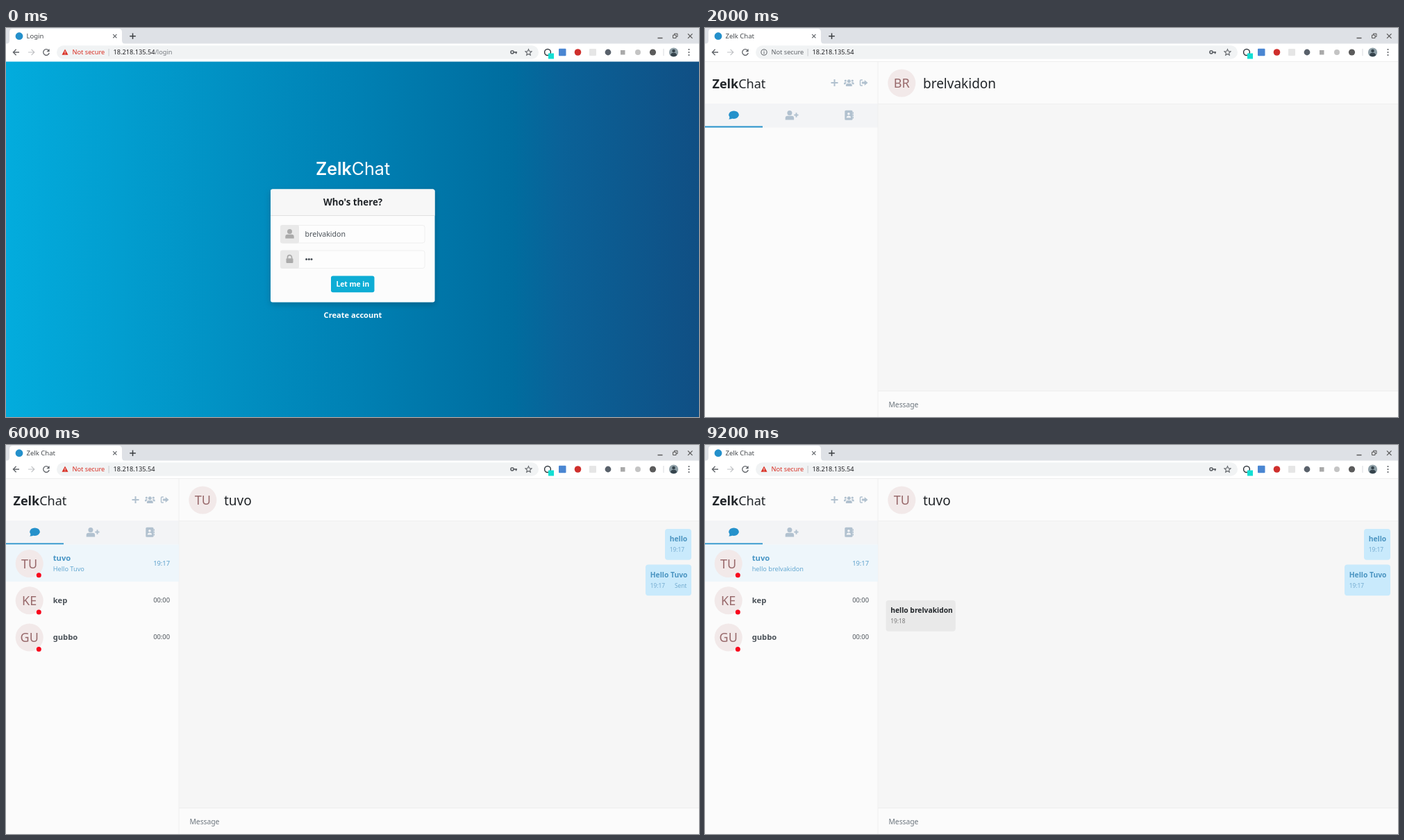
An HTML page that plays this animation: 998 px wide and 561 px high, repeating every 10000 ms.

```html
<!DOCTYPE html>
<html lang="en">
<head>
<meta charset="utf-8">
<title>Chat walkthrough</title>
<style>
  html, body { margin: 0; width: 100%; height: 100%; overflow: hidden; background: #fff; }
  svg { display: block; width: 100%; height: 100%; }
  text { font-family: "Noto Sans", "Open Sans", sans-serif; white-space: pre; }
  .logo { font-family: Inter, sans-serif; }
</style>
</head>
<body>
<svg id="stage" viewBox="0 0 998 561">
  <defs>
    <linearGradient id="sea">
      <stop offset="0" stop-color="#03acdd"/>
      <stop offset=".5" stop-color="#0081b4"/>
      <stop offset=".73" stop-color="#006d9f"/>
      <stop offset=".8" stop-color="#0a6298"/>
      <stop offset="1" stop-color="#104f84"/>
    </linearGradient>
    <filter id="shadow" x="-10%" y="-10%" width="120%" height="125%">
      <feDropShadow dx="0" dy="3" stdDeviation="4" flood-opacity=".2"/>
    </filter>
  </defs>
  <g id="page"></g>
  <g id="browser"></g>
</svg>
<script>
const LOOP = 10000, STEP = 2000;
const BLUE = '#2591cb', PALE = '#b1c1cf', INK = '#212529', RED = '#d93025', GREY = '#5f6368';
const BRAND = ['Zelk', 'Chat'], USER = 'brelvakidon';
const FRIENDS = ['tuvo', 'kep', 'gubbo'];

const rect = (x, y, w, h, fill, rx = 0, more = '') =>
  `<rect x="${x}" y="${y}" width="${w}" height="${h}" rx="${rx}" fill="${fill}" ${more}/>`;
const dot = (x, y, r, fill, more = '') => `<circle cx="${x}" cy="${y}" r="${r}" fill="${fill}" ${more}/>`;
const line = (d, color, width = 1.2, more = '') =>
  `<path d="${d}" fill="none" stroke="${color}" stroke-width="${width}" ${more}/>`;
const shape = (d, fill) => `<path d="${d}" fill="${fill}"/>`;
const text = (x, y, size, str, fill = INK, weight = 400, more = '') =>
  `<text x="${x}" y="${y}" font-size="${size}" fill="${fill}" font-weight="${weight}" ${more}>${str}</text>`;
const at = (x, y, body) => `<g transform="translate(${x} ${y})">${body}</g>`;
const MID = 'text-anchor="middle"', END = 'text-anchor="end"';
const capital = s => s[0].toUpperCase() + s.slice(1);

// Icons are drawn around their own centre.
const icon = {
  comment: c => `<ellipse cy="-.6" rx="7.3" ry="5.8" fill="${c}"/>` + shape('M-6 1.5Q-5.8 4-7.3 5.8Q-4 6-1.5 4.2Z', c),
  person: c => dot(0, -3.2, 3.5, c) + shape('M-6.2 6.8V4.2Q-6.2 1-3 1H3Q6.2 1 6.2 4.2V6.8Z', c),
  addPerson: c => at(-2.6, 0, icon.person(c)) + line('M7 -3.5V3M3.8 -.3H10', c, 1.9),
  book: c => rect(-6.2, -7, 11.2, 14, c, 1.6) +
    rect(5, -4.6, 1.4, 2.6, c) + rect(5, -1.2, 1.4, 2.6, c) + rect(5, 2.2, 1.4, 2.6, c) +
    dot(-.6, -2, 1.8, '#f3f4f6') + shape('M-3.8 3.6Q-3.8 .6-.6 .6Q2.6 .6 2.6 3.6Z', '#f3f4f6'),
  people: c => dot(0, -2.2, 2.5, c) + dot(-5, -3, 1.6, c) + dot(5, -3, 1.6, c) +
    shape('M-4.4 5V3.6Q-4.4 1-2 1H2Q4.4 1 4.4 3.6V5Z', c) +
    shape('M-7.3 2.2V.8Q-7.3-.8-5.6-.8H-3.4L-5.2 2.2ZM7.3 2.2V.8Q7.3-.8 5.6-.8H3.4L5.2 2.2Z', c),
  plus: c => line('M0 -5V5M-5 0H5', c, 2),
  leave: c => line('M-1.6 -4H-4Q-5 -4-5 -3V3Q-5 4-4 4H-1.6', c, 1.5) +
    shape('M-2.6-1.4H1.2V-4L6 0L1.2 4V1.4H-2.6Z', c),
  check: c => line('M-4.6 .4L-1.6 3.3L4.8 -3.2', c, 2),
  cross: c => line('M-3.2 -3.2L3.2 3.2M3.2 -3.2L-3.2 3.2', c, 2),
  lock: c => rect(-5, -1, 10, 6.6, c, 1.2) + line('M-3 -.5V-2.6A3 3 0 0 1 3 -2.6V-.5', c, 1.7),
};
const put = (name, x, y, color = PALE) => at(x, y, icon[name](color));

function browser(title, path, warn) {
  const tint = warn ? RED : GREY;
  const badge = warn
    ? shape('M85 30.6L89.5 38.8H80.5Z', RED) + rect(84.5, 33.4, 1, 2.6, '#fff') + rect(84.5, 36.7, 1, 1, '#fff')
    : dot(85, 35, 4.1, 'none', `stroke="${GREY}"`) + rect(84.5, 34.3, 1, 3, GREY) + rect(84.5, 32.5, 1, 1, GREY);
  const extensions =
    dot(780, 35, 4.4, 'none', 'stroke="#333a40" stroke-width="1.5"') + rect(781, 36.5, 8, 8, '#13dfd3') +
    rect(796, 29.8, 10.5, 10.5, '#4a86d2', 1) + dot(823.5, 35, 4.8, '#cf2f2c') +
    rect(840, 30, 10, 10, '#e6e6e6', 1) + dot(867, 35, 4.4, '#59616b') +
    rect(885, 32, 6.5, 6.5, '#aaa') + dot(910, 35, 4, '#c4c4c4') + dot(931.5, 35, 4.6, '#5b5b5b');
  return rect(0, 0, 998, 23, '#dee1e6') +
    rect(0, 22.5, 998, 26, '#fff') +
    shape('M0 23Q5 23 5 18V6Q5 1 10 1H162Q167 1 167 6V18Q167 23 172 23Z', '#fff') +
    dot(19, 11.7, 5.4, '#2490cb') +
    text(29.5, 15, 9.5, title, '#45494d') +
    line('M154.2 9.2L159.4 14.4M159.4 9.2L154.2 14.4', GREY, 1.2) +
    line('M182.5 7.5V16M178.2 11.7H186.8', '#3c4043', 1.5) +
    line('M938.5 14.5H945.5', '#555', 1.4) +
    line('M960.5 10.2H965V14.5H960.5ZM962.5 10V8.2H967V12.5H965.2', '#555', 1) +
    line('M982 8.3L988.5 14.8M988.5 8.3L982 14.8', '#555', 1.2) +
    line('M19 35H10.6M14.6 30.8L10.4 35L14.6 39.2', GREY, 1.3) +
    line('M32 35H40.6M36.6 30.8L40.8 35L36.6 39.2', '#c0c2c5', 1.2) +
    line('M61.3 32.2A4.3 4.3 0 1 0 62.2 36', GREY, 1.3) + shape('M62.6 30V34.2H58.4Z', GREY) +
    rect(73, 25.3, 694, 19.4, '#f1f3f4', 9.7) + badge +
    text(95.5, 38.4, 9.2, 'Not secure', tint) +
    rect(147.6, 30, 1, 10.5, '#c8cbce') +
    text(154.5, 38.4, 9.2, `18.218.135.54<tspan fill="#777b80">${path}</tspan>`, '#202124') +
    dot(729, 34.8, 2.1, 'none', `stroke="${GREY}" stroke-width="1.6"`) + line('M731 34.8H736M734.6 34.8V37.2', GREY, 1.7) +
    line('M752.5 30.6L753.8 33.6L757 33.9L754.6 36L755.3 39.2L752.5 37.5L749.7 39.2L750.4 36L748 33.9L751.2 33.6Z', GREY, 1.1) +
    extensions +
    rect(946.5, 30, 1, 10, '#dadce0') +
    dot(961.5, 35, 6.6, '#8fa0a8') + dot(961.5, 33, 2.3, '#35434c') + shape('M957 39.6Q957 35.8 961.5 35.8Q966 35.8 966 39.6Q961.5 43 957 39.6Z', '#35434c') +
    [31, 35, 39].map(y => dot(983.5, y, 1.1, GREY)).join('');
}

function loginPage() {
  const field = (y, name) => rect(395.5, y, 207.5, 25.5, '#fdfdfd', 3, 'stroke="#efefef"') +
    rect(395, y - .5, 27, 26.5, '#e9e9e9', 3) + put(name, 408.5, y + 12.3, '#aaa');
  return rect(0, 48, 998, 513, 'url(#sea)') +
    text(499.5, 212, 25, `<tspan font-weight="600">${BRAND[0]}</tspan>${BRAND[1]}`, '#fff', 400, MID + ' class="logo"') +
    rect(381, 232.5, 236.5, 163, '#fcfcfc', 3, 'filter="url(#shadow)"') +
    shape('M381 270V235.5Q381 232.5 384 232.5H614.5Q617.5 232.5 617.5 235.5V270Z', '#f7f7f7') +
    rect(381, 270, 236.5, 1, '#e0e0e0') +
    text(499.5, 256, 13.3, "Who's there?", INK, 600, MID) +
    field(284.5, 'person') + text(430.5, 300.7, 10.6, USER, '#495057') +
    field(321, 'lock') + [432.6, 436.3, 440].map(x => dot(x, 333.5, 1.5, '#495057')).join('') +
    rect(468, 357.5, 62.5, 23.7, '#0eadd5', 3) +
    text(499.3, 373, 10.3, 'Let me in', '#fff', 600, MID) +
    text(499.5, 418.3, 11.1, 'Create account', '#fff', 600, MID);
}

const avatar = (x, y, name) => dot(x, y, 20, '#f2e9e9') +
  text(x, y + 6.5, 18, name.slice(0, 2).toUpperCase(), '#98696b', 400, MID);

function appPage(tab, peer, side, chat = '') {
  const tabs = ['comment', 'addPerson', 'book']
    .map((name, i) => put(name, 41.5 + 83 * i, 125.8, i === tab ? BLUE : PALE)).join('');
  return rect(0, 48, 998, 513, '#fbfbfb') +
    rect(0, 48, 998, 1, '#dcdcdc') +
    rect(249, 109.5, 749, 414, '#f6f6f6') +
    rect(249, 109, 749, 1, '#efefef') + rect(249, 523, 749, 1, '#ededed') +
    rect(0, 109, 249, 34.5, '#f3f4f6') + rect(248.5, 49, 1, 512, '#f0f0f0') +
    rect(83 * tab, 141.5, 83, 2, BLUE) + tabs +
    text(10.5, 87, 18, `<tspan font-weight="600">${BRAND[0]}</tspan>${BRAND[1]}`) +
    put('plus', 186.5, 79) + put('people', 207.3, 79) + put('leave', 228.5, 79) +
    avatar(283.3, 79.5, peer) + text(314, 86.5, 19, peer) +
    side + chat + text(264.5, 547, 10.3, 'Message', '#6c757d');
}

const requests = () => FRIENDS.map((name, i) => {
  const y = 172 + 56 * i;
  return avatar(33.7, y, name) + text(60.5, y + 4, 11.2, name, INK, 600) +
    put('check', 196, y) + put('cross', 223, y);
}).join('');

const contacts = last => rect(0, 143.5, 249, 53.5, '#eef6fb') + FRIENDS.map((name, i) => {
  const y = 171 + 53.3 * i, open = i === 0;
  return avatar(33.7, y, name) + dot(47.3, y + 16.8, 3.5, '#f8061c') +
    text(67.7, open ? 167 : y + 3.7, 11.2, name, open ? '#4795c5' : '#495057', 600) +
    (open ? text(67.7, 182, 9.2, last, '#66a9d2') : '') +
    text(236, y + 2.8, 9.3, open ? '19:17' : '00:00', open ? '#5a9fcb' : '#495057', 400, END);
}).join('');

function bubble(x, y, w, message, time, mine, status = '') {
  const [back, ink, faint] = mine ? ['#c9eafc', '#4a94c1', '#74acd0'] : ['#e9e9e9', INK, '#777'];
  return rect(x, y, w, 44.7, back, 4) +
    text(x + 6.7, y + 18.4, 10.3, message, ink, 600) +
    text(x + 6.7, y + 33.4, 8.3, time, faint) +
    text(x + w - 6.7, y + 33.4, 8.3, status, faint, 400, END);
}

const sent = 'Hello ' + capital(FRIENDS[0]), reply = 'hello ' + USER;
const talk = status => bubble(949, 121, 38, 'hello', '19:17', true) +
  bubble(921, 172.5, 66, sent, '19:17', true, status);

const appTitle = BRAND.join(' ');
const scenes = [
  [loginPage(), browser('Login', '/login', true)],
  [appPage(0, USER, ''), browser(appTitle, '', false)],
  [appPage(1, USER, requests()), browser(appTitle, '', false)],
  [appPage(0, FRIENDS[0], contacts(sent), talk('Sent')), browser(appTitle, '', true)],
  [appPage(0, FRIENDS[0], contacts(reply), talk('') + bubble(260.5, 224, 100.3, reply, '19:18', false)), browser(appTitle, '', true)],
];

const pageLayer = document.getElementById('page'), browserLayer = document.getElementById('browser');
const start = performance.now();
let shown = -1;

function update(now) {
  const index = Math.floor(Math.max(0, now - start) % LOOP / STEP);
  if (index !== shown) {
    [pageLayer.innerHTML, browserLayer.innerHTML] = scenes[index];
    shown = index;
  }
  requestAnimationFrame(update);
}
update(start);
</script>
</body>
</html>
```
